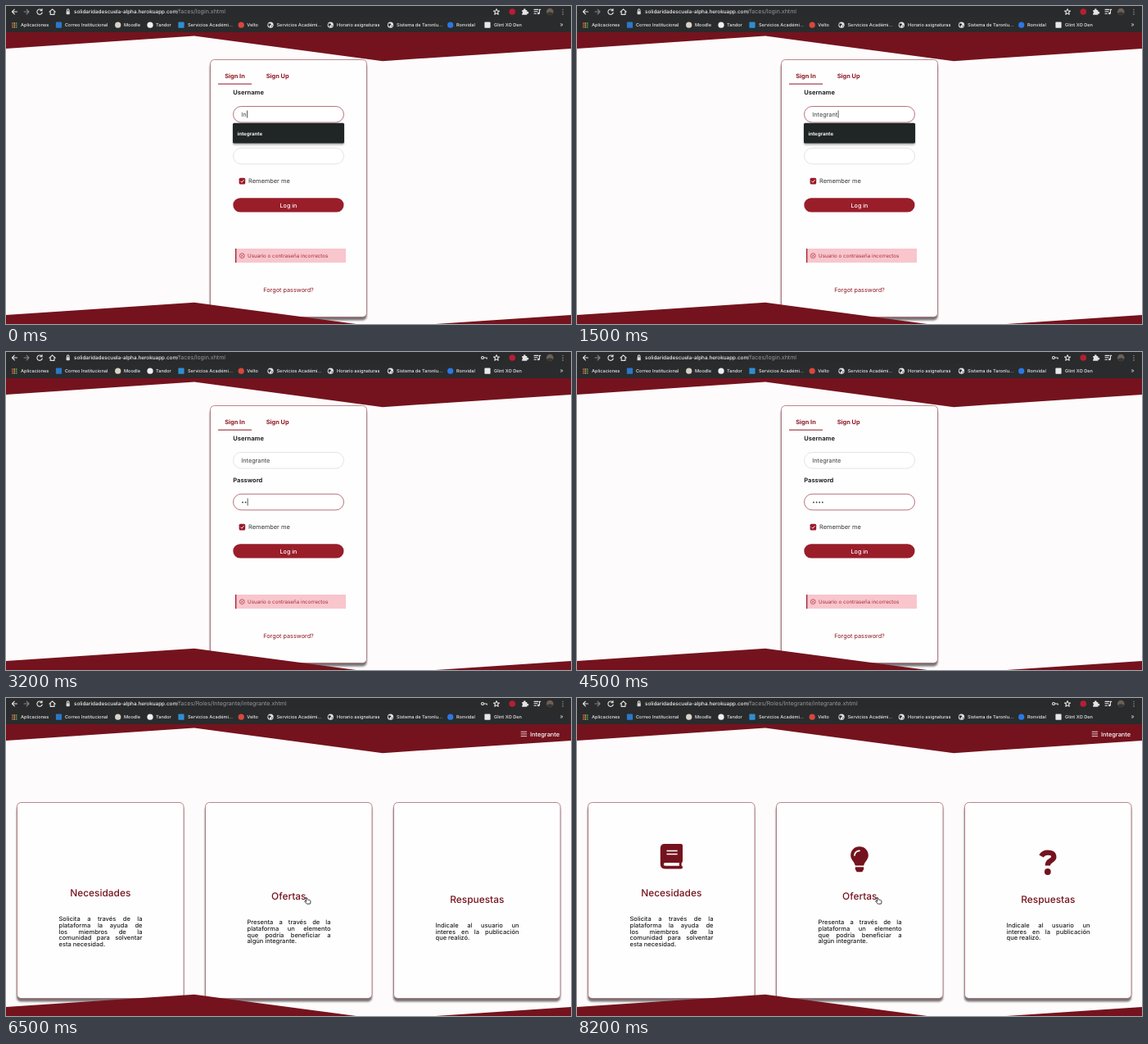
An HTML page for the animation above (8.4 s loop, 690 by 388 pixels).

```html
<!DOCTYPE html>
<html lang="es">
<head>
<meta charset="utf-8">
<title>Login</title>
<style>
html, body { margin: 0; width: 100%; height: 100%; overflow: hidden; background: #fdfbfb; }
svg { display: block; width: 100vw; height: 100vh; font-family: Inter, "Open Sans", sans-serif; text-rendering: geometricPrecision; }
.line { fill: none; stroke: #e4e4e4; stroke-width: 1.1; stroke-linecap: round; stroke-linejoin: round; }
.dim { stroke: #85878a; }
.bold { font-weight: 700; }
.mid { font-weight: 500; }
.red { fill: #8f1724; }
.maroon { fill: #74131e; }
.card { fill: #fefefe; stroke: #a35f69; stroke-width: .75; }
.field { fill: #fff; stroke-width: .8; }
</style>
</head>
<body>
<svg id="stage" viewBox="0 0 690 388" preserveAspectRatio="none">
  <defs>
    <filter id="blur" x="-10%" y="-10%" width="120%" height="120%"><feGaussianBlur stdDeviation="1.2"/></filter>
  </defs>
  <rect width="690" height="388" fill="#fdfbfb"/>
  <path class="maroon" d="M0 32H690V51.9L460 67.2L230 36.6L0 51.9Z"/>

  <g id="login">
    <g id="loginCard"></g>
    <g class="red bold" font-size="7.4" text-anchor="middle">
      <text x="279.5" y="87.7">Sign In</text>
      <text x="331.7" y="87.7">Sign Up</text>
    </g>
    <rect class="red" x="259" y="94.6" width="41" height="1"/>
    <g class="bold" font-size="7.5" fill="#24262a">
      <text x="277.3" y="107.7">Username</text>
      <text x="277.3" y="158.5">Password</text>
    </g>
    <rect id="userBox" class="field" x="277.5" y="122.5" width="135" height="19.5" rx="9.75"/>
    <text id="user" x="287.3" y="134.9" font-size="7.3" fill="#3b3e42"></text>
    <rect id="passBox" class="field" x="277.5" y="173.3" width="135" height="19.5" rx="9.75"/>
    <g id="dots" fill="#333"></g>
    <rect id="caret" width=".8" height="9" fill="#333"/>
    <g id="hint">
      <rect x="277" y="144.5" width="136" height="25" rx="2" fill="#000" opacity=".3" filter="url(#blur)"/>
      <rect x="277" y="142.8" width="136" height="24.8" rx="1.5" fill="#202526"/>
      <text class="bold" x="282.5" y="157.7" font-size="6.1" fill="#f1f1f1">integrante</text>
    </g>
    <rect x="284.6" y="209.7" width="7.6" height="7.8" rx="1.6" fill="#991b2a"/>
    <path d="M286.4 213.7l1.5 1.5 2.7-3" fill="none" stroke="#fff" stroke-width=".9"/>
    <text x="296" y="216.4" font-size="7.4" fill="#33363a">Remember me</text>
    <rect id="button" x="277.3" y="234.3" width="135.2" height="17.2" rx="8.6"/>
    <text class="mid" x="345" y="245.6" font-size="7.2" text-anchor="middle" fill="#fff">Log in</text>
    <rect x="280" y="296" width="135" height="17.2" fill="#f8c6cc"/>
    <rect x="280" y="296" width="1.3" height="17.2" fill="#9c1f30"/>
    <circle cx="288.3" cy="304.7" r="2.9" fill="none" stroke="#a62a3b" stroke-width=".7"/>
    <path d="M287.2 303.6l2.2 2.2m0-2.2l-2.2 2.2" stroke="#a62a3b" stroke-width=".7"/>
    <text x="295" y="306.9" font-size="6.25" fill="#a62a3b">Usuario o contraseña incorrectos</text>
    <text class="red" x="345" y="348.6" font-size="7.3" text-anchor="middle">Forgot password?</text>
  </g>

  <g id="home">
    <path d="M628.7 41.2h7.4m-7.4 2.7h7.4m-7.4 2.7h7.4" stroke="#f1e4e5" stroke-width=".9"/>
    <text class="mid" x="640" y="46.6" font-size="7.4" fill="#fff">Integrante</text>
    <g id="cards"></g>
    <g id="icons" class="maroon">
      <path d="M107 178H127Q129 178 129 180V199Q129 200.3 127.8 201Q127.2 203 127.8 204.8Q129 205.2 129 206.4Q129 208.4 127 208.4H107.5Q101.8 208.4 101.8 202.5V183.5Q101.8 178 107 178Z"/>
      <path d="M107.7 201H125Q124.6 203 125 204.8H107.7Q105.8 204.5 105.8 202.9Q105.8 201.3 107.7 201Z" fill="#fff"/>
      <path d="M109.5 186.5h13.2m-13.2 4h13.2" stroke="#fff" stroke-width="1.7"/>
      <path d="M345 181.3C351.4 181.3 355.8 186.2 355.8 192C355.8 197.5 351.2 199.6 350.2 204.6H339.8C338.8 199.6 334.2 197.5 334.2 192C334.2 186.2 338.6 181.3 345 181.3Z"/>
      <path d="M339.8 206.2H350.2V209L348.2 212.2H341.8L339.8 209Z"/>
      <path d="M339 192Q339.3 186.8 345 186.3" fill="none" stroke="#fff" stroke-width="1.7" stroke-linecap="round"/>
      <path d="M567 193Q569.5 188.7 575 188.7C583.8 188.7 584.2 195.6 578.5 198.6Q574.8 200.5 574.8 204.6" fill="none" stroke="#74131e" stroke-width="6.3"/>
      <circle cx="574.8" cy="212" r="3.9"/>
    </g>
  </g>

  <path class="maroon" d="M0 377L230 361.7L460 392.3L690 377V388H0Z"/>

  <g id="browser">
    <rect width="690" height="32" fill="#2a2b2d"/>
    <rect x="66" y=".6" width="542" height="13" rx="6.5" fill="#292a2c"/>
    <path class="line" d="M13.5 7H7.5m2.8-2.8L7.5 7l2.8 2.8"/>
    <path class="line dim" d="M22 7h6m-2.8-2.8L28 7l-2.8 2.8"/>
    <path class="line" d="M43.6 5.2A3.2 3.2 0 1 0 44.2 8M44 3.6V5.8H41.8"/>
    <path class="line" d="M53 7.2L56.6 3.8L60.2 7.2M54.2 6.6V10.4H59V6.6"/>
    <rect x="73.6" y="6.2" width="4.2" height="4" rx=".6" fill="#d8d8d8"/>
    <path class="line" d="M74.5 6V5a1.2 1.2 0 0 1 2.4 0V6" stroke-width=".8"/>
    <text class="mid" x="83" y="9.3" font-size="6.35" fill="#f2f2f2">solidaridadescuela-alpha.herokuapp.com</text>
    <text id="path" x="208.3" y="9.3" font-size="7.05" fill="#989b9e"></text>
    <g id="key">
      <circle class="line" cx="582" cy="7" r="1.5"/>
      <path class="line" d="M583.6 7h3.6v1.3"/>
    </g>
    <path class="line" stroke-width=".8" d="M599 3.6l1 2.3 2.5.2-1.9 1.6.6 2.5-2.2-1.3-2.2 1.3.6-2.5-1.9-1.6 2.5-.2z"/>
    <circle cx="618.3" cy="7" r="3.8" fill="#b81e32"/>
    <path d="M630.2 5h1.9a1.3 1.3 0 1 1 2.4 0h1.8v2a1.3 1.3 0 1 1 0 2.2v1.6h-6.1V9a1.3 1.3 0 0 0 0-2.4z" fill="#e4e4e4"/>
    <path class="line" d="M645 4.4h5m-5 2.4h4m-4 2.4h2.5M651.5 8.8V4.4h1.2"/>
    <circle cx="650.3" cy="9" r="1.3" fill="#e4e4e4"/>
    <circle cx="664.3" cy="7" r="4.3" fill="#6c6156"/>
    <path d="M660.4 8.8A4.3 4.3 0 0 0 668.2 8.8Q664.3 5.5 660.4 8.8Z" fill="#383532"/>
    <path class="line" d="M680 4.2v.1M680 7v.1M680 9.8v.1" stroke-width="1.5"/>
    <g id="marks"></g>
    <text x="676.5" y="25.4" font-size="7" fill="#e4e4e4">»</text>
  </g>

  <g id="cursor">
    <path id="beam" d="M-1.7-3.7Q0-3.7 0-2.8Q0-3.7 1.7-3.7M0-2.8V2.8M-1.7 3.7Q0 3.7 0 2.8Q0 3.7 1.7 3.7" fill="none" stroke="#222" stroke-width=".8"/>
    <path id="arrow" d="M-2-4V4L0 2.3L1.4 5.2L2.6 4.6L1.3 1.9H3.8Z" fill="#111" stroke="#fff" stroke-width=".6"/>
    <path id="hand" d="M-1.9-3.2Q-1-4.3-.3-3L.3-.9Q1-1.5 1.5-.6Q2.3-1.1 2.7-.2Q3.6-.5 3.8.6L4 2.1L3.3 4.2H-.6L-3.1 1.4Q-3.5.1-2.1.5L-1.1 1.3Z" fill="#fff" stroke="#111" stroke-width=".8" stroke-linejoin="round"/>
  </g>
</svg>
<script>
const LOOP = 8400;
const $ = id => document.getElementById(id);

function add(parent, tag, attrs, text) {
  const el = document.createElementNS("http://www.w3.org/2000/svg", tag);
  for (const k in attrs) el.setAttribute(k, attrs[k]);
  if (text) el.textContent = text;
  parent.appendChild(el);
  return el;
}

function card(parent, x, y, width, height) {
  add(parent, "rect", { x: x - .5, y: y + 4, width: width + .5, height, rx: 5, fill: "#4a4446", opacity: .75, filter: "url(#blur)" });
  add(parent, "rect", { x, y, width, height, rx: 5, class: "card" });
}

function justified(x, y, lines) {
  lines.forEach((line, i) => {
    const el = add($("cards"), "text", { x, y: y + i * 7.65, "font-size": 7.5, class: "mid", fill: "#1f1f21" }, line);
    if (i < lines.length - 1) {
      const gap = (102 - el.getComputedTextLength()) / (line.split(" ").length - 1);
      el.style.wordSpacing = gap + "px";
    }
  });
}

function offer(x, title, y, lines) {
  card($("cards"), x, 127.5, 203.5, 239);
  add($("cards"), "text", { x: x + 101.8, y, "font-size": 11.9, "text-anchor": "middle", class: "mid maroon" }, title);
  justified(x + 51, y + 30, lines);
}

function bookmark(x, icon, color, tx, label) {
  const g = $("marks");
  if (icon === "grid") {
    for (let i = 0; i < 9; i++)
      add(g, "rect", { x: x - 3.2 + i % 3 * 2.4, y: 20.2 + Math.floor(i / 3) * 2.4, width: 1.6, height: 1.6, fill: ["#d95b50", "#d6b34b", "#5c9f69"][i % 3] });
  } else if (icon === "square") {
    add(g, "rect", { x: x - 3.6, y: 19.6, width: 7.2, height: 7.2, rx: .8, fill: color });
  } else {
    add(g, "circle", { cx: x, cy: 23.2, r: 3.6, fill: color });
    if (icon === "globe") add(g, "path", { d: `M${x - 2.6} 21.2l2.8.3 .7 1.6-1.7.6-.4 2.2-1.5-2.5zM${x + 1.3} 24l1.6-.5-1.3 2.3z`, fill: "#2a2b2d" });
  }
  add(g, "text", { x: tx, y: 25.4, "font-size": 5.6, class: "mid", fill: "#e9e9e9" }, label);
}

[
  [10.3, "grid", "", 18, "Aplicaciones"],
  [64.5, "square", "#2a78c8", 72, "Correo Institucional"],
  [136.7, "circle", "#d9d2c8", 144, "Moodle"],
  [176, "circle", "#f0f0f0", 183, "Tandor"],
  [214, "square", "#2f8fd0", 222, "Servicios Académi..."],
  [287.2, "circle", "#d9483c", 294.3, "Velto"],
  [323, "globe", "#e6e6e6", 330.5, "Servicios Académi..."],
  [396.3, "globe", "#e6e6e6", 404, "Horario asignaturas"],
  [469.5, "globe", "#e6e6e6", 477, "Sistema de Taronlu..."],
  [542.7, "circle", "#2c78e4", 550, "Ronvidal"],
  [588, "square", "#e9e9e9", 596, "Glint XO Den"]
].forEach(m => bookmark(...m));

card($("loginCard"), 249.5, 65.5, 191, 314);
offer(13.5, "Necesidades", 242.4, ["Solicita a través de la", "plataforma la ayuda de", "los miembros de la", "comunidad para solventar", "esta necesidad."]);
offer(243.5, "Ofertas", 246.2, ["Presenta a través de la", "plataforma un elemento", "que podría beneficiar a", "algún integrante."]);
offer(473.5, "Respuestas", 250.1, ["Indicale al usuario un", "interes en la publicación", "que realizó."]);
for (let i = 0; i < 4; i++) add($("dots"), "circle", { cx: 289 + i * 3.6, cy: 183.4, r: .9 });

const word = "Integrante";
const keys = [0, 0, 300, 500, 700, 900, 1100, 1200, 1400, 1600];
const dotKeys = [2900, 3200, 3500, 3800];
// time, x, y
const route = [[1800, 348, 204], [2100, 345.5, 191], [4700, 345.5, 191], [5400, 368, 247]];

const show = (id, on) => $(id).setAttribute("visibility", on ? "visible" : "hidden");
const count = (list, t) => list.filter(k => k <= t).length;
const border = on => on ? "#a5505d" : "#dfdddd";

function pointer(t) {
  let i = 0;
  while (i < route.length - 1 && t >= route[i + 1][0]) i++;
  const a = route[i], b = route[i + 1] || a;
  const p = b === a ? 0 : Math.max(0, (t - a[0]) / (b[0] - a[0]));
  const e = p * p * (3 - 2 * p);
  return [a[1] + (b[1] - a[1]) * e, a[2] + (b[2] - a[2]) * e];
}

function draw(time) {
  const t = Math.floor(time / 100) * 100;
  const home = t >= 6400;
  const inPass = t >= 2400 && t < 5700;
  const inUser = t < 2400;
  const [x, y] = pointer(t);
  const overPass = t >= 2000 && y < 194;
  const overButton = y > 234 && y < 252;

  $("login").style.display = home ? "none" : "";
  $("home").style.display = home ? "" : "none";
  $("icons").style.display = t >= 7300 ? "" : "none";
  $("path").textContent = home ? "/faces/Roles/Integrante/integrante.xhtml" : "/faces/login.xhtml";
  show("key", t >= 2900);

  if (!home) {
    $("user").textContent = word.slice(0, count(keys, t));
    $("userBox").setAttribute("stroke", border(inUser));
    $("passBox").setAttribute("stroke", border(inPass || overPass));
    $("hint").style.display = inUser ? "" : "none";
    const dots = count(dotKeys, t);
    [...$("dots").children].forEach((d, i) => d.setAttribute("visibility", i < dots ? "visible" : "hidden"));
    const blink = t < 1700 || (inPass && t < 4400 && (t < 2700 || t >= 2900));
    $("caret").style.display = blink ? "" : "none";
    if (blink) {
      $("caret").setAttribute("x", inUser ? 287.8 + $("user").getComputedTextLength() : 287.5 + dots * 3.6);
      $("caret").setAttribute("y", inUser ? 127.5 : 178.5);
    }
    $("button").setAttribute("fill", overButton ? "#72131e" : "#9a1d2a");
  }

  const seen = (t >= 1800 && t < 2900) || t >= 4700;
  const shape = overPass ? "beam" : overButton ? "hand" : "arrow";
  for (const id of ["beam", "arrow", "hand"]) show(id, seen && id === shape);
  $("cursor").setAttribute("transform", `translate(${x} ${y})`);
}

const start = performance.now();
function tick() {
  draw((performance.now() - start) % LOOP);
  requestAnimationFrame(tick);
}
tick();
</script>
</body>
</html>
```
